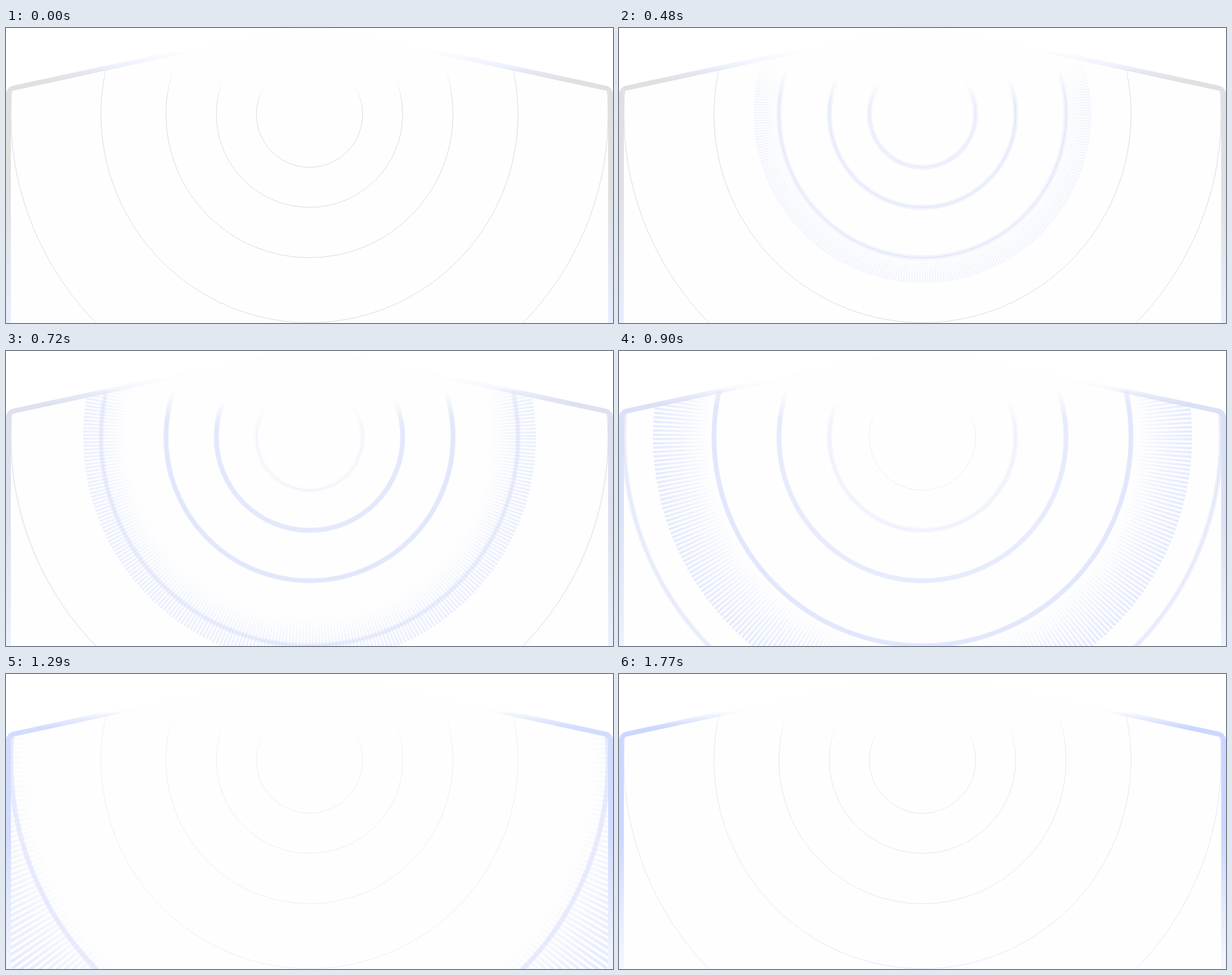
Animation of 1000 by 486 pixels, one loop 1800 ms. Source, as an HTML page with a canvas:

```html
<!DOCTYPE html>
<html lang="en">
<head>
<meta charset="utf-8">
<title>Radiating rings</title>
<style>
  html, body { margin: 0; width: 100%; height: 100%; overflow: hidden; background: #fff; }
  canvas { display: block; }
</style>
</head>
<body>
<canvas width="1000" height="486"></canvas>
<script>
const ctx = document.querySelector('canvas').getContext('2d');
const LOOP = 1800, STEP = 30;
const CX = 500, CY = 142, TAU = Math.PI * 2, TICKS = 386;
const PAPER = [254, 254, 254], GRAY = [224, 224, 224], BLUE = [204, 215, 255], PALE = [232, 237, 255];
const LINE_GRAY = [216, 219, 226], LINE_FAINT = [238, 238, 248], LINE_BLUE = [226, 229, 253];

// Each ring glows between its start and end time.
const rings = [
  { radius: 87.5, start: 100, end: 800, strength: 0.55 },
  { radius: 153.5, start: 360, end: 980, strength: 1 },
  { radius: 236.5, start: 360, end: 1150, strength: 1 },
  { radius: 343.5, start: 570, end: 1295, strength: 1 },
  { radius: 492, start: 700, end: 1550, strength: 1 }
];

const clamp = x => Math.min(1, Math.max(0, x));
const mix = (a, b, p) => a.map((v, i) => v + (b[i] - v) * p);
const rgba = (color, alpha = 1) => `rgba(${color.map(Math.round)},${alpha})`;

function addStops(gradient, color, stops) {
  for (const [offset, alpha] of stops) gradient.addColorStop(offset, rgba(color, alpha));
  return gradient;
}

function verticalFade(color, stops) {
  const scaled = stops.map(([y, alpha]) => [y / 486, alpha]);
  return addStops(ctx.createLinearGradient(0, 0, 0, 486), color, scaled);
}

function housePath() {
  ctx.beginPath();
  ctx.moveTo(4, 500);
  ctx.arcTo(4, 100.7, 500, -6.4, 11);
  ctx.lineTo(500, -6.4);
  ctx.arcTo(996, 100.7, 996, 500, 11);
  ctx.lineTo(996, 500);
}

function circle(radius, width, style) {
  ctx.beginPath();
  ctx.arc(CX, CY, radius, 0, TAU);
  ctx.lineWidth = width;
  ctx.strokeStyle = style;
  ctx.stroke();
}

function drawWave(t) {
  const outer = 88.5 + 0.395 * t, inner = 88 + 0.29 * t;
  if (t === 0 || inner > 608) return;
  const middle = (outer + inner) / 2, pitch = TAU * middle / TICKS, dash = pitch * 0.56;
  const alpha = 0.5 * clamp(t / 900);
  const fade = addStops(ctx.createRadialGradient(CX, CY, inner, CX, CY, outer), BLUE,
    [[0, 0], [0.5, 0.6 * alpha], [1, alpha]]);
  ctx.setLineDash([dash, pitch - dash]);
  ctx.lineDashOffset = (dash - pitch) / 2;
  circle(middle, outer - inner, fade);
  ctx.setLineDash([]);
}

function drawRing({ radius, start, end, strength }, t) {
  const progress = clamp((t - start) / (end - start));
  const glow = strength * Math.sin(Math.PI * progress);
  if (glow > 0.001) circle(radius, 8, rgba(BLUE, 0.55 * glow));
  const settled = mix(LINE_FAINT, LINE_BLUE, clamp((t - 1200) / 500));
  circle(radius, 1, rgba(mix(LINE_GRAY, settled, progress)));
}

// Hides the rings softly beneath the peak.
function drawVeil() {
  ctx.save();
  ctx.translate(CX, 20);
  ctx.scale(400, 100);
  ctx.fillStyle = addStops(ctx.createRadialGradient(0, 0, 0, 0, 0, 1.1), PAPER,
    [[0, 1], [0.65, 1], [1, 0]]);
  ctx.fillRect(-2, -2, 4, 4);
  ctx.restore();
}

function strokeHouse(color, stops) {
  ctx.strokeStyle = verticalFade(color, stops);
  ctx.stroke();
}

function drawFrame(t) {
  const p = clamp((t - 450) / 1000);
  const body = alpha => [[61, 0], [88, alpha], [265, alpha], [486, 0]];
  housePath();
  ctx.lineWidth = 8;
  strokeHouse(PALE, [[37 + 25 * p, 0], [72, 1 - p], [486, 1 - 0.6 * p]]);
  strokeHouse(GRAY, body(1 - p));
  strokeHouse(BLUE, body(p));
}

function draw(t) {
  ctx.fillStyle = '#fff';
  ctx.fillRect(0, 0, 1000, 486);
  ctx.save();
  housePath();
  ctx.clip();
  ctx.fillStyle = rgba(PAPER);
  ctx.fillRect(0, 0, 1000, 486);
  ctx.beginPath();
  ctx.rect(8, 0, 984, 486);
  ctx.clip();
  drawWave(t);
  for (const ring of rings) drawRing(ring, t);
  drawVeil();
  ctx.restore();
  drawFrame(t);
}

function tick() {
  const t = Math.floor(performance.now() % LOOP / STEP) * STEP;
  draw(t < 2 * STEP ? 0 : t);
  requestAnimationFrame(tick);
}
tick();
</script>
</body>
</html>
```
